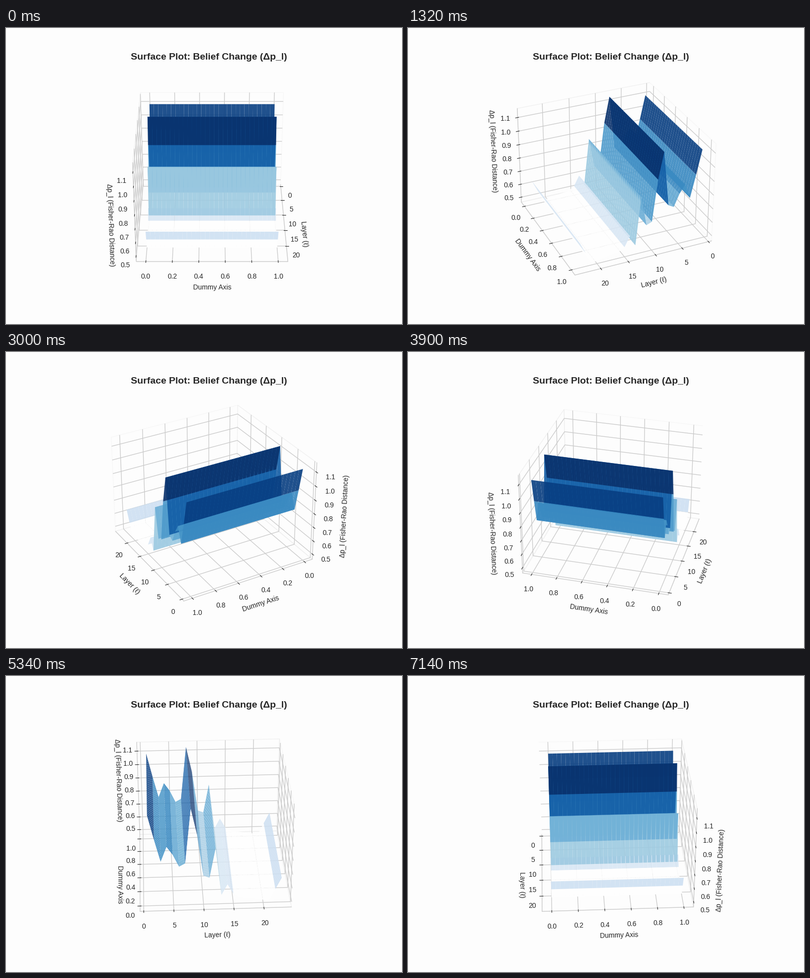
A matplotlib script that plays this animation: 800x600 px, repeating every 7200 ms.

```python
import numpy as np
import matplotlib.pyplot as plt
from matplotlib.animation import FuncAnimation
from matplotlib.colors import ListedColormap

FRAMES = 120
INTERVAL = 60
PAPER = "#fdfdfd"

plt.rcParams.update({
    "font.family": ["Liberation Sans", "DejaVu Sans"],
    "text.color": ".15",
    "axes.labelcolor": ".15",
    "xtick.color": ".15",
    "ytick.color": ".15",
    "axes.edgecolor": ".8",
    "axes.linewidth": 1,
    "grid.color": ".8",
    "grid.linewidth": 1,
    "lines.solid_capstyle": "round",
})


def peak(x, center, height, left=1, right=1):
    """Bump that falls off to zero at its left and right reach."""
    d = np.abs(x - center) / np.where(x < center, left, right)
    return height * np.clip(1 - d ** 1.4, 0, None)


def belief_change(x):
    """Slowly falling base level with a few sharp peaks."""
    base = np.interp(x, [3, 11, 13, 21], [0.782, 0.6565, 0.5275, 0.4755])
    return (base
            + peak(x, 1, 0.328, right=1.6)
            + peak(x, 4, 0.121, right=2.1)
            + peak(x, 8, 0.448, left=1.08, right=2)
            + peak(x, 12, 0.276)
            + peak(x, 14, 0.0835, right=1.2)
            + peak(x, 23, 0.1655, left=1.66))


def limits(values, margin):
    lo, hi = np.min(values), np.max(values)
    for part in (margin, 1 / 48):
        pad = (hi - lo) * part
        lo, hi = lo - pad, hi + pad
    return lo, hi


layers = np.arange(1, 24)
dummy = np.linspace(0, 1, 30)
X, Y = np.meshgrid(layers, dummy)
Z = belief_change(X)

# Blues with the lowest tenth bleached to white
shades = plt.get_cmap("Blues")(np.linspace(0, 1, 256))
shades[:26] = 1
blues = ListedColormap(shades)

fig = plt.figure(figsize=(8, 6), dpi=100, facecolor=PAPER)
ax = fig.add_subplot(projection="3d", facecolor=PAPER)
ax.plot_surface(X, Y, Z, cmap=blues, edgecolor="none", alpha=0.9)

ax.set_xlim(limits(layers, 0.05))
ax.set_ylim(limits(dummy, 0.05))
ax.set_zlim(limits(Z, 0))
for axis in (ax.xaxis, ax.yaxis, ax.zaxis):
    axis.pane.fill = False

ax.set_title("Surface Plot: Belief Change (Δp_l)", fontsize=14, weight="bold")
ax.set_xlabel("Layer (ℓ)")
ax.set_ylabel("Dummy Axis")
ax.set_zlabel("Δp_l (Fisher-Rao Distance)")


def turn(i):
    ax.view_init(elev=30, azim=i * 360 / FRAMES)
    return ()


anim = FuncAnimation(fig, turn, frames=FRAMES, interval=INTERVAL,
                     repeat=True, repeat_delay=0)
plt.show()
```
